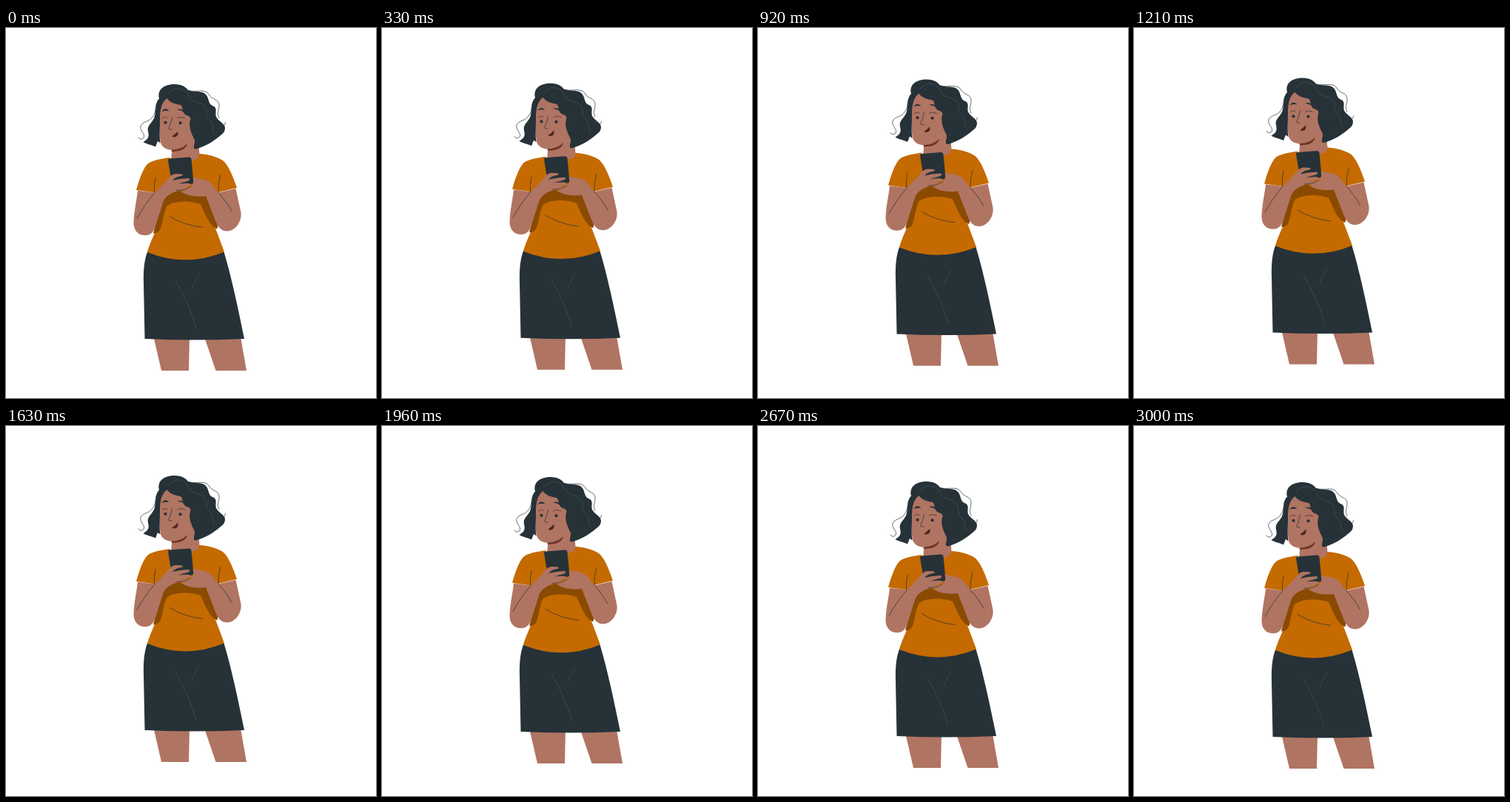
Animation, 500 px wide and 500 px high, one loop 3040 ms. Source, as an HTML page:

```html
<!DOCTYPE html>
<html lang="en">
<head>
<meta charset="utf-8">
<style>
html, body { margin: 0; height: 100%; overflow: hidden; background: #fff; }
svg { display: block; width: 100vw; height: 100vh; }
.skin { fill: #b07462; }
.dark { fill: #263238; }
.shirt { fill: #c46a00; }
.shade { fill: #8a4a00; }
.line, .soft { fill: none; stroke: #263238; stroke-width: .7; stroke-linecap: round; stroke-linejoin: round; }
.soft { stroke: #455a64; stroke-width: .6; }
</style>
</head>
<body>
<svg viewBox="0 0 500 500">
<g id="woman">
  <!-- legs and skirt -->
  <path class="skin" d="M199.500 417L210 462.500H247L248 417ZM268 417L283.500 462.500H325L317 417Z"/>
  <path class="dark" d="M191 302C187 313 185.500 325 186 345L187.500 419.500Q255 422.500 322 419.500C314 380 305 337 294.500 302Z"/>
  <path class="soft" d="M229 341Q248 374 257 405M260.500 333Q254 344 251.500 352"/>

  <!-- neck and shirt -->
  <path class="skin" d="M225 155L223 180L245 192L262 177L260 150Z"/>
  <path class="shirt" d="M220 174.500C208 177 196 178 190 184.500C183 194 179 208 176 218.500L201 222L202 274C197 286 193 294 191 302.500Q243 323.500 295 302L283 270L287 221.500L312 215.500C306 198 300 184 293 178.500C284 172.500 271 170 261 169.500C261 175 258 177 252 178L236 186Z"/>
  <path class="shade" d="M199 277L211 231L226 219L272 224L287 262L285.500 271C275 267 271 255 263 237.500C250 232 226 233 217.500 240C212 250 212 267 207 274Q203 277 199 277Z"/>
  <path class="line" d="M221 254Q240 266 266 269M202 202Q199.500 212 200.500 222M290 198Q286.500 210 287 221"/>

  <!-- phone and arms -->
  <path class="dark" d="M219 178.500Q219 176.300 221 176L247 174Q250 174 250.500 177L253 203V209L236 211L223 203Z"/>
  <path class="skin" d="M178 219.300L201 222C209 214 216 207 222 200Q225 196.500 230 196.500L238 197Q240 199 236 200L227 204L243 201.500Q251 202 247 206L232 210L247 209Q252 210 249 213L236 216L246 215Q250 217 246 218L233 219.500C224 222 216 226 212.500 234L203 264C200 274 197 279 189 279.800C179 280 173 274 172.500 264C172.500 250 176 236 178 219.300Z"/>
  <path class="skin" d="M252 201.500C262 203 270 204 275 207.500C280 212 282 217 287 222L310.500 216.500L317.500 249C319 262 309 274 299 274C290 273.500 287 269 283.500 261L270 226.500C259 228 246 227 237 221C242 219 248 217 250 214Q254 210 253 206Z"/>
  <path class="line" d="M201 222Q186 240 177 257M287 222Q299 235 305 247M230 219Q243 219 249 214"/>
  <path class="dark" d="M225 205.500Q229 200 239 199.500L252 201L253 204L246 202.500Q235 203 225 205.500ZM238 208.500Q247 207 249 204H253V209L250 210.500Q245 208 238 208.500Z"/>

  <!-- face -->
  <path class="skin" d="M208 94C206 118 207 140 208.500 152C209.500 160 215 164 226 164.500C242 164 253 158 257 150L252 100L230 84Z"/>
  <path fill="#6f3424" d="M223.500 164.300Q238 163.500 245 155.500Q243 166.500 224 166.500Z"/>
  <path class="dark" d="M210.500 112.500Q215 105.500 220.500 111.500Q215 110.500 210.500 112.500ZM231 109.500Q239 107.500 244 115Q238 111 231 109.500Z"/>
  <path class="line" d="M211 122Q214 118.500 218 121M231.500 121.500Q236 118.500 241.500 121.500M224.500 120Q223 129 219.500 135.500Q221 137.500 224 136.500"/>
  <circle class="dark" cx="215.500" cy="127.300" r="2.100"/>
  <circle class="dark" cx="235.500" cy="127.800" r="2.100"/>
  <path fill="#4d2620" d="M224.500 146C228 143 230 142 232 139.300Q233.500 144 230.500 146Q227 148 224.500 146Z"/>

  <!-- hair -->
  <path class="dark" d="M207 95C204 82 214 75.500 228 75.500C238 75.500 243 79.500 246 83.500C254 87 266 83 271 90.500C275 97 273 102 280 105C287 108 281 116 285 121C288 126 295 128 296 134Q296 139 293 142C283 151 271 159 257 163C251 163.500 255.500 157 255 151C250 141 246 132 249.500 122C249 119 246 118 243 117C237 113 240 107 236 103.500C229 102 222 101 217.500 94.500C210 100 208 110 208 122C208 135 207 145 208.500 155L205 152.500L202 160C196 157 191 157 185.500 153.500C198 147 190 140 192 134C194 128 200 125 201 118C203 108 202 99 207 95Z"/>
  <path class="line" d="M207 97C199 103 205 113 197 121C194 126 184 126 182 132C180 138 189 143 186 148Q182 152 179 147.500M247 84C256 87 269 81 274 89C278 97 288 95 288 104C288 112 284 114 288 121M288 136Q296 133 296.500 127"/>
  <path class="soft" d="M219 89C227 77 242 80 247 92C252 101 261 99 267 104C274 110 268 118 275 124C282 130 277 136 282 142"/>
</g>
</svg>
<script>
const woman = document.getElementById("woman");
const LOOP = 3040, PEAK = 1470, LIFT = 4.6, BASE = .5;

function draw(now) {
  const phase = 2 * Math.PI * (now % LOOP - PEAK) / LOOP;
  const y = BASE - LIFT * (1 + Math.cos(phase));
  woman.setAttribute("transform", `translate(0 ${y.toFixed(3)})`);
  requestAnimationFrame(draw);
}
requestAnimationFrame(draw);
</script>
</body>
</html>
```
